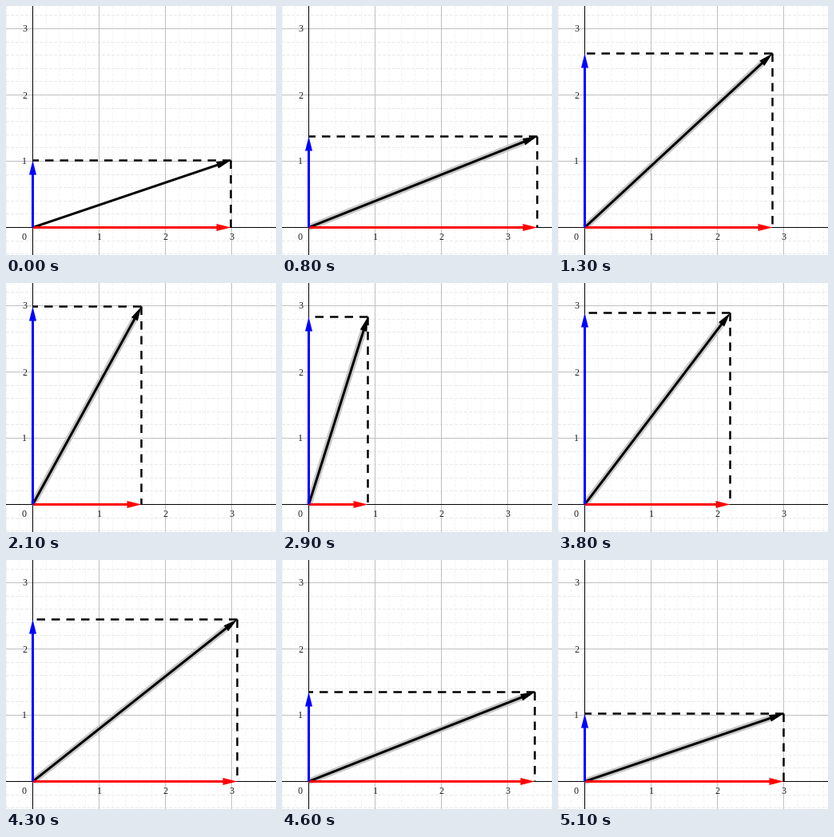
Animation, 338 px wide and 312 px high, one loop 5300 ms. Source, as a matplotlib script:

```python
import numpy as np
import matplotlib.pyplot as plt
from matplotlib.animation import FuncAnimation
from matplotlib.patches import Polygon

W, H, DPI = 338, 312, 100
PX = 72 / DPI                      # one pixel in points
OX, OY, UNIT = 33.5, 277.5, 83     # origin and unit length in pixels
FRAMES, STEP_MS = 53, 100
HEAD, HALF = 18, 4.5               # arrowhead length and half width
DASH = (10.5, 8)

# Key points of the drag: (step, x, y)
KEYS = np.array([
    (0, 281, 193), (1, 281, 193), (6, 319, 163), (8, 327, 114),
    (10, 268, 59), (12, 235, 43), (16, 169, 29), (21, 96, 46),
    (22, 107, 42), (29, 215, 37), (33, 289, 74), (35, 331, 132),
    (36, 316, 165), (39, 282, 192)], dtype=float)
KEY_STEP, KEY_POS = KEYS[:, 0], KEYS[:, 1:] + 0.5
KEY_SLOPE = np.gradient(KEY_POS, KEY_STEP, axis=0)

# The drag pauses for one frame about twice a second
PAUSES = {1, 28, 49, *range(4, 25, 5), *range(32, 53, 5)}

plt.rcParams["lines.scale_dashes"] = False
plt.rcParams["path.snap"] = False
fig = plt.figure(figsize=(W / DPI, H / DPI), dpi=DPI, facecolor="white")
ax = fig.add_axes([0, 0, 1, 1])
ax.set(xlim=(0, W), ylim=(H, 0))
ax.axis("off")


def tip_at(step):
    """Cubic Hermite curve through the key points."""
    k = min(np.searchsorted(KEY_STEP, step, side="right"), len(KEYS) - 1) - 1
    h = KEY_STEP[k + 1] - KEY_STEP[k]
    t = (step - KEY_STEP[k]) / h
    ease = t * t * (3 - 2 * t)
    return ((1 - ease) * KEY_POS[k] + ease * KEY_POS[k + 1]
            + h * t * (1 - t) * ((1 - t) * KEY_SLOPE[k] - t * KEY_SLOPE[k + 1]))


def line(xs, ys, color, width, z, dashes=None):
    style = (0, [d * PX for d in dashes]) if dashes else "-"
    return ax.plot(xs, ys, color=color, lw=width * PX, ls=style, zorder=z,
                   solid_capstyle="butt", dash_capstyle="butt")[0]


def grid_pair(k, x_color, y_color, z, dashes=None):
    x = np.floor(OX + k * UNIT / 5) + 0.5
    y = np.floor(OY - k * UNIT / 5) + 0.5
    line([x, x], [0, H], x_color, 1, z, dashes)
    line([0, W], [y, y], y_color, 1, z, dashes)


def draw_grid():
    for k in range(-2, 19):
        if k == 0:
            grid_pair(k, "black", "black", 2)
        elif k % 5 == 0:
            grid_pair(k, "#c0c0c0", "#c0c0c0", 1)
        else:
            grid_pair(k, "#f4f4f4", "#e9e9e9", 0, (4, 2))


def label(x, y, text):
    ax.text(x, y, text, family="Liberation Serif", size=12 * PX,
            color="#202020", ha="center", va="baseline", zorder=3)


def draw_labels():
    label(23, 293, "0")
    for n in (1, 2, 3):
        label(OX + n * UNIT, 293, str(n))
        label(23, OY - n * UNIT + 4, str(n))


class Arrow:
    def __init__(self, color, z):
        self.shaft = line([], [], color, 3, z)
        self.head = ax.add_patch(
            Polygon(np.zeros((3, 2)), fc=color, ec="none", zorder=z))

    def point_to(self, x, y):
        tip = np.array([x, y])
        d = tip - (OX, OY)
        d = d / np.hypot(*d)
        side = HALF * np.array([-d[1], d[0]])
        base = tip - HEAD * d
        self.shaft.set_data([OX, base[0] + d[0]], [OY, base[1] + d[1]])
        self.head.set_xy([tip, base + side, base - side])
        return base


draw_grid()
draw_labels()
across = line([], [], "black", 2.5, 4, DASH)
down = line([], [], "black", 2.5, 4, DASH)
glow = line([], [], "#c8c8c8", 8, 5)
total = Arrow("black", 6)
x_part = Arrow("red", 7)
y_part = Arrow("blue", 8)


def update(i):
    step = i - sum(p <= i for p in PAUSES)
    x, y = tip_at(step)
    across.set_data([x, OX], [y, y])
    down.set_data([x, x], [y, OY])
    base = total.point_to(x, y)
    x_part.point_to(x, OY)
    y_part.point_to(OX, y)
    glow.set_data([OX, base[0]], [OY, base[1]])
    glow.set_visible(step > 0)
    return ()


anim = FuncAnimation(fig, update, frames=FRAMES, interval=STEP_MS,
                     init_func=lambda: update(0), repeat=True, repeat_delay=0)
plt.show()
```
